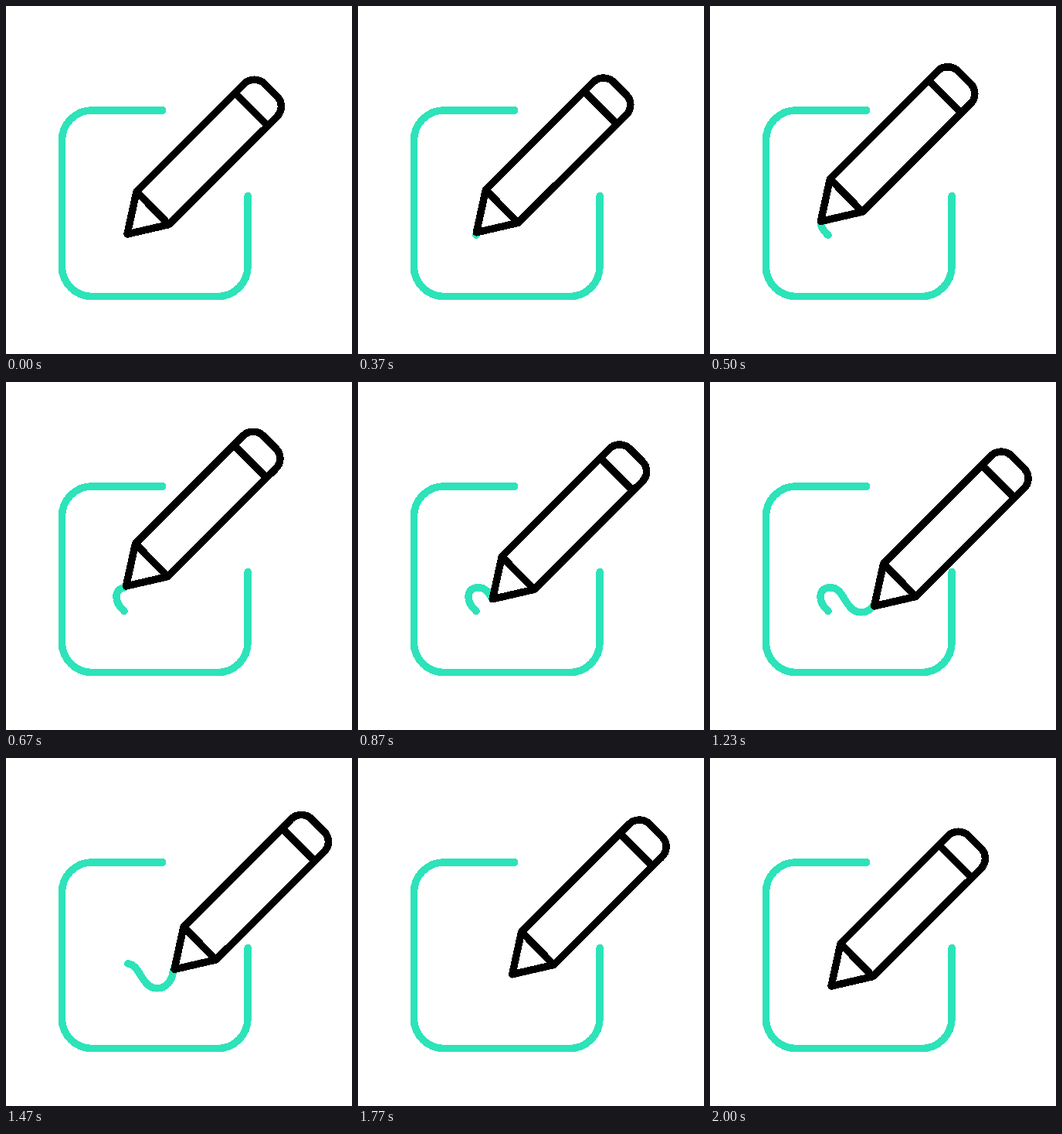
Write an HTML page that moves like this. It is 448 px wide and 450 px high and loops after 2030 ms.

```html
<!DOCTYPE html>
<html lang="en">
<head>
<meta charset="utf-8">
<title>Pencil writing</title>
<style>
html, body { margin: 0; width: 100%; height: 100%; overflow: hidden; background: #fff; }
svg { display: block; width: 448px; height: 450px; }
path {
  fill: none; stroke-width: 9.5; stroke-linecap: round; stroke-linejoin: round;
  shape-rendering: crispEdges;
}
.green { stroke: #2de3b9; }
.black { stroke: #000; }
</style>
</head>
<body>
<svg viewBox="0 0 448 450">
  <path class="green" d="M202.8 134.9H111.4a39 39 0 0 0-39 39V336.6a39 39 0 0 0 39 39H274.1a39 39 0 0 0 39-39V245.5"/>
  <path id="ink" class="green" pathLength="1"
    d="M153 296.3C146 290 143 284 143 278C143 269.5 148.5 265.8 156 265.8C166 265.8 170 274 175 282C180 290 185 297.8 196 297.8C207 297.8 216 288 216.5 274"/>
  <!-- drawn with the tip at 0,0 -->
  <g id="pencil">
    <path class="black" style="fill:#fff"
      d="M0 0L12 -55L151 -194C158 -201.7 171 -201.7 178 -194L193.4 -178.6C201.4 -171.1 201.4 -159.1 193.4 -151.6L53.8 -12.4Z"/>
    <path class="black" d="M12 -55L53.8 -12.4M139.4 -182.4L181.4 -140.4"/>
  </g>
  <path id="route" d="M153.4 292.8C148 288 143 282 143 275C143 268 149 264 156 264C166 264 170 274 175 282C180 290 184 298 196 298C209 298 218 287 218 273.3"/>
</svg>
<script>
const LOOP = 2030;
const REST = { x: 157, y: 295 };
// steps of 1/30 s
const DRAW = 11, ERASE = 41, RETURN = 50, END = 60;

const ink = document.getElementById('ink');
const pencil = document.getElementById('pencil');
const route = document.getElementById('route');
const routeLength = route.getTotalLength();
const routeEnd = route.getPointAtLength(routeLength);

const progress = (step, from, to) => Math.min(1, Math.max(0, (step - from) / (to - from)));

function tipAt(step) {
  if (step < DRAW) return REST;
  if (step <= RETURN) return route.getPointAtLength(routeLength * progress(step, DRAW, ERASE));
  const p = progress(step, RETURN, END);
  return {
    x: routeEnd.x + (REST.x - routeEnd.x) * p,
    y: routeEnd.y + (REST.y - routeEnd.y) * p
  };
}

function render(ms) {
  // step changes fall on a 10 ms clock
  const step = Math.floor(Math.floor((ms % LOOP) / 10) * 0.3 + 0.15);
  const tip = tipAt(step);
  pencil.setAttribute('transform', `translate(${tip.x} ${tip.y})`);

  const head = progress(step, DRAW, ERASE);
  const tail = progress(step, ERASE, RETURN);
  ink.style.display = step >= DRAW && step < RETURN ? '' : 'none';
  ink.setAttribute('stroke-dasharray', `${Math.max(0.001, head - tail)} 2`);
  ink.setAttribute('stroke-dashoffset', -tail);
}

const start = performance.now();
function tick() {
  render(performance.now() - start);
  requestAnimationFrame(tick);
}
tick();
</script>
</body>
</html>
```
